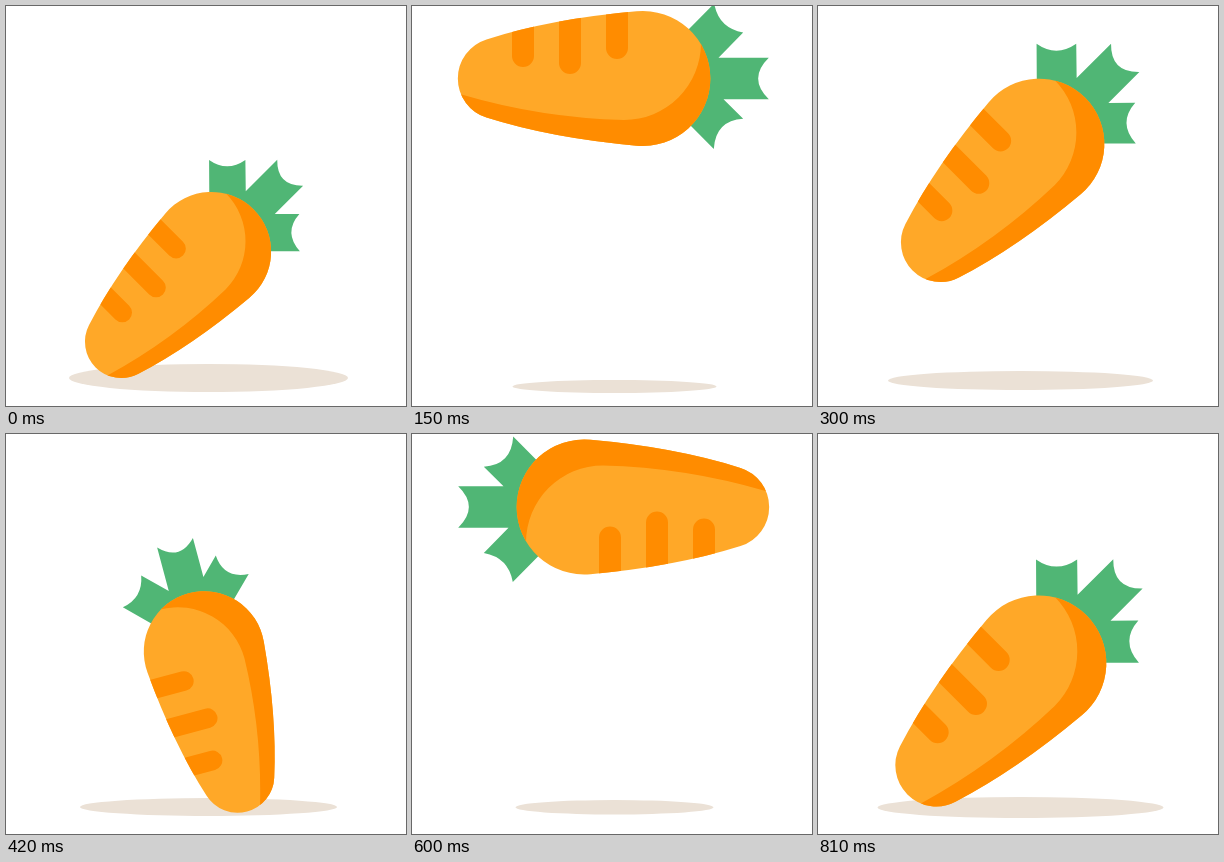
Recreate the animation shown at these times as an HTML page with a canvas. Size 400 by 400 pixels, loop 0.88 s.

```html
<!DOCTYPE html>
<html lang="en">
<head>
<meta charset="utf-8">
<title>Bouncing carrot</title>
<style>
html, body { margin: 0; width: 100%; height: 100%; overflow: hidden; background: #fff; }
canvas { display: block; }
</style>
</head>
<body>
<canvas id="stage" width="400" height="400"></canvas>
<script>
const ctx = document.getElementById('stage').getContext('2d');
const LOOP = 880, STEP = 30, LAST = 27;
const LIGHT = '#ffa828', DARK = '#ff8c00', GREEN = '#50b675', SHADOW = '#ebe1d6';

// step, x, y, angle, scale, shadow: half width, half height, y
const KEYS = [
  [0, 187, 264, -45, .885, 139.5, 14, 372],
  [5, 201.5, 72.5, 0, 1, 102, 6.5, 380.5],
  [10, 201, 158, -45, .967, 132.5, 9.5, 374.5],
  [12, 203, 216, -75, .925, 138, 9.8, 373.7],
  [14, 205, 243, -105, .895, 128.5, 9, 373],
  [17, 202.5, 163.4, -146.8, .98, 108.5, 8, 373],
  [20, 201.5, 73, -180, 1, 99, 7.3, 373.3],
  [23, 201.5, 131.8, -146, 1.004, 102.5, 7.5, 373.5],
  [27, 199.8, 250, -45, 1.003, 143, 10.5, 373.5]
];

// The carrot lies along the x axis, leaves to the right.
const body = new Path2D(`M-127 -39.1 Q-61.5 -59.8 23 -67.2 A67.5 67.5 0 1 1 23 67.2
  Q-61.5 59.8 -127 39.1 A41 41 0 0 1 -127 -39.1Z`);
const shade = new Path2D(`M-170 10 L-152 16 Q-72 39.5 10.5 41.5 A77 77 0 0 0 87.5 -35.5
  H110 V80 H-170Z`);
const leaves = new Path2D(`M75 -49 L100.7 -75 Q105 -50.5 129.7 -46 L105 -20.7 H155.3
  Q134 0 155.3 20.7 H110 L129.7 40.3 Q102 42 100.3 70.5 L77 47 L60 0Z`);
const grooves = new Path2D('M-90.5 -80 V-22.5 M-43.5 -80 V-15.5 M3.5 -80 V-30.5');

// Smooth curve through the keys
function pose(n) {
  let i = 0;
  while (i < KEYS.length - 2 && n >= KEYS[i + 1][0]) i++;
  const a = KEYS[i], b = KEYS[i + 1];
  const before = KEYS[i - 1] || a, after = KEYS[i + 2] || b;
  const span = b[0] - a[0], u = (n - a[0]) / span, v = 1 - u;
  return a.map((p, k) => {
    const ma = (b[k] - before[k]) / (b[0] - before[0]) * span;
    const mb = (after[k] - p) / (after[0] - a[0]) * span;
    return p * v * v * (1 + 2 * u) + b[k] * u * u * (1 + 2 * v) + ma * u * v * v - mb * u * u * v;
  });
}

function fill(path, color) {
  ctx.fillStyle = color;
  ctx.fill(path);
}

function draw() {
  const n = Math.min(LAST, Math.floor(performance.now() % LOOP / STEP));
  const [, x, y, angle, scale, rx, ry, shadowY] = pose(n);
  ctx.clearRect(0, 0, 400, 400);

  const shadow = new Path2D();
  shadow.ellipse(202.5, shadowY, rx, ry, 0, 0, 2 * Math.PI);
  fill(shadow, SHADOW);

  ctx.save();
  ctx.translate(x, y);
  ctx.rotate(angle * Math.PI / 180);
  ctx.scale(scale, scale);
  fill(leaves, GREEN);
  fill(body, LIGHT);
  ctx.clip(body);
  fill(shade, DARK);
  ctx.strokeStyle = DARK;
  ctx.lineWidth = 22;
  ctx.lineCap = 'round';
  ctx.stroke(grooves);
  ctx.restore();
  requestAnimationFrame(draw);
}
draw();
</script>
</body>
</html>
```
